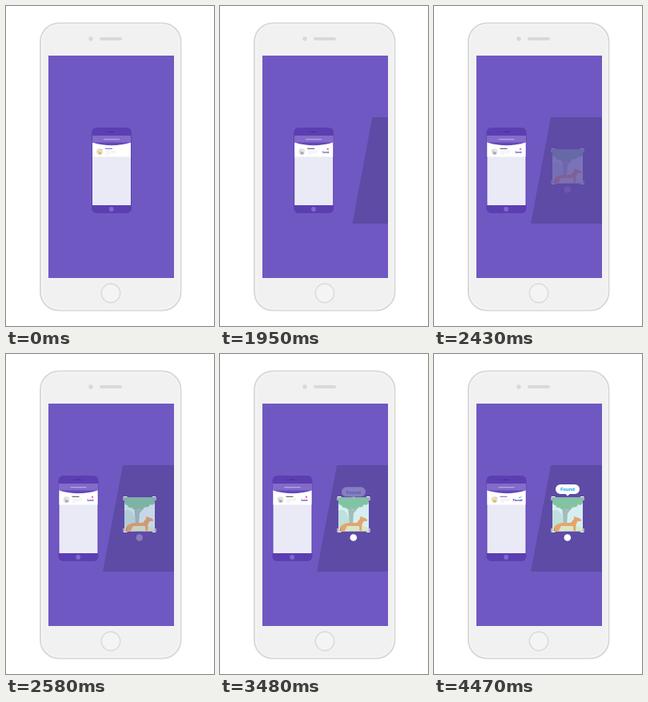
Recreate the animation shown at these times as an HTML page. Size 260 px wide and 400 px high, loop 4.5 s.

```html
<!DOCTYPE html>
<html>
<head>
<meta charset="utf-8">
<style>
  html, body { margin: 0; width: 260px; height: 400px; overflow: hidden; background: #fff; }
  svg { display: block; }
  text { font-family: Lato, "Open Sans", sans-serif; font-weight: 900; text-anchor: middle; }
</style>
</head>
<body>
<svg width="260" height="400" viewBox="0 0 260 400">
  <defs>
    <clipPath id="screen"><path d="M53 62H210V340H53z"/></clipPath>
    <clipPath id="picture"><path d="M148 179.5H186V221.5H148z"/></clipPath>
  </defs>

  <!-- device -->
  <rect x="43" y="21.5" width="175.5" height="359" rx="23" fill="#f1f1f1" stroke="#d9d9d9" stroke-width="2"/>
  <rect x="44.6" y="23.1" width="172.3" height="355.8" rx="21.5" fill="none" stroke="#fafafa"/>
  <circle cx="106" cy="41" r="2.7" fill="#d9d9d9"/>
  <rect x="117" y="39" width="28" height="4" rx="2" fill="#d9d9d9"/>
  <circle cx="131" cy="359" r="11.7" fill="#f4f4f4" stroke="#d9d9d9" stroke-width="1.4"/>
  <path d="M53 62H210V340H53z" fill="#7058c2"/>

  <g clip-path="url(#screen)">
    <path id="panel" d="M146 139H210V272H121z" fill="#5d4ba6"/>

    <!-- small phone -->
    <g id="phone">
      <rect x="107" y="152" width="50" height="107" rx="6" fill="#5b3fb2"/>
      <circle cx="125.5" cy="157.3" r=".7" fill="#432c91"/>
      <rect x="128.5" y="156.8" width="7" height="1" rx=".5" fill="#432c91"/>
      <circle cx="131.7" cy="254" r="2.9" fill="#8168ca"/>
      <path d="M108 162H156V249H108z" fill="#eaeaf6"/>
      <path d="M108 169H156V188.5H108z" fill="#fff"/>
      <path d="M108 162H156V170.5Q132 178 108 170.5z" fill="#6546bd"/>
      <path d="M108 162H156V170.5H108z" fill="#836bc9"/>
      <path d="M122 166.7H142" stroke="#c3b6e8"/>
      <path d="M124.5 181H137M124.5 183H136.5M124.5 185H129" stroke="#e2e2e8" stroke-width=".7"/>
      <g id="grey">
        <circle cx="117" cy="182" r="4" fill="#e3e3e5"/>
        <path d="M115 180l1.3 2.4 3 .3-.2 2.6-3.2.2z" fill="#a5a5aa"/>
        <path d="M124 178.3H133" stroke="#55525f" stroke-width="1.1"/>
      </g>
      <g id="colour">
        <circle cx="117" cy="182" r="4" fill="#e6e5c5"/>
        <path d="M115 180l1.3 2.4 3 .3-.2 2.6-3.2.2z" fill="#dfb46b"/>
        <path d="M117.5 179h2.5v2z" fill="#a9d1b5"/>
        <path d="M124 178.3H133" stroke="#7d61d0" stroke-width="1.1"/>
      </g>
      <text id="lost" x="147" y="183.6" font-size="4.2" fill="#5632c4">Lost</text>
      <circle id="dot" cx="149.5" cy="178.7" r="1.3" fill="#f5709a"/>
      <g id="found">
        <text x="146" y="183.6" font-size="4.2" fill="#5632c4">Found</text>
        <path d="M147.5 179l1 1 2.3-2.2" fill="none" stroke="#2cb4ee" stroke-width=".9"/>
      </g>
    </g>

    <!-- photo -->
    <g id="photo">
      <g clip-path="url(#picture)">
        <path d="M148 179H186V222H148z" fill="#d6eef1"/>
        <path d="M148 196q7-3 11 4t3 22h-14z" fill="#bfe0dc"/>
        <path d="M160 190l5 0 1 5 6-5 2 1-7 8-1 14h-4z" fill="#a1bdb8"/>
        <path d="M148 179H186V186q-2 4-6 2-2 5-7 3-4 5-9 2-4 3-7-1-4 1-5-3-3 0-4-3z" fill="#82c3a4"/>
        <path d="M148 216q20-4 38 1v5h-38z" fill="#d9e6c6"/>
        <path d="M150 222q-1-7 4-9 4-2 8-2l9 0 4-5 .5-3.5 2 1.5 4 1 3 2.5-1 1.5-4 0-2 4-.5 9h-2.2l-1-7-7 0-8 0-3 6.500z" fill="#e2a66d"/>
        <path d="M151 215q-1 4-1.500 7h2z" fill="#c98d57"/>
      </g>
      <path d="M147 183V178.500H151.500M183 178.500H187V183M187 218V222.500H183M151.500 222.500H147V218" fill="none" stroke="#fff" stroke-width="1"/>
    </g>
    <circle id="shutter" cx="166.800" cy="229.500" r="4.300" fill="#fff"/>

    <g id="bubble">
      <path d="M158 163H176a6 6 0 0 1 0 12H169.500L167 177.500 164.500 175H158a6 6 0 0 1 0-12z" fill="#fff"/>
      <text x="167" y="171.300" font-size="6.400" fill="#29a9e6">Found</text>
    </g>
  </g>
</svg>
<script>
  const $ = id => document.getElementById(id);
  const span = (t, from, to) => Math.min(1, Math.max(0, (t - from) / (to - from)));
  const smooth = p => p * p * (3 - 2 * p);
  const out = p => 1 - (1 - p) ** 3;
  const ease = (t, from, to) => smooth(span(t, from, to));
  const fade = (id, value) => $(id).setAttribute('opacity', value);
  const move = (id, x, y = 0) => $(id).setAttribute('transform', `translate(${x} ${y})`);

  function draw(now) {
    const t = now % 4500;
    const lose = ease(t, 180, 450);
    const recover = ease(t, 3600, 3930);
    fade('grey', lose * (1 - recover));
    fade('colour', 1 - lose * (1 - recover));
    fade('lost', ease(t, 810, 1080) * (1 - recover));
    fade('dot', ease(t, 1250, 1530) * (1 - recover));
    fade('found', ease(t, 4110, 4470));

    move('phone', -41.5 * ease(t, 1830, 2130));
    move('panel', 90 * (1 - ease(t, 1830, 2070)));

    const shown = out(span(t, 2400, 2730));
    const shot = ease(t, 2880, 3180);
    fade('photo', shown * (0.96 + 0.04 * shot));
    fade('shutter', shown * (0.3 + 0.7 * shot));

    const pop = out(span(t, 3450, 3750));
    fade('bubble', pop);
    move('bubble', 0, 4.5 * (1 - pop));
  }

  const start = performance.now();
  function tick() {
    draw(performance.now() - start);
    requestAnimationFrame(tick);
  }
  tick();
</script>
</body>
</html>
```
